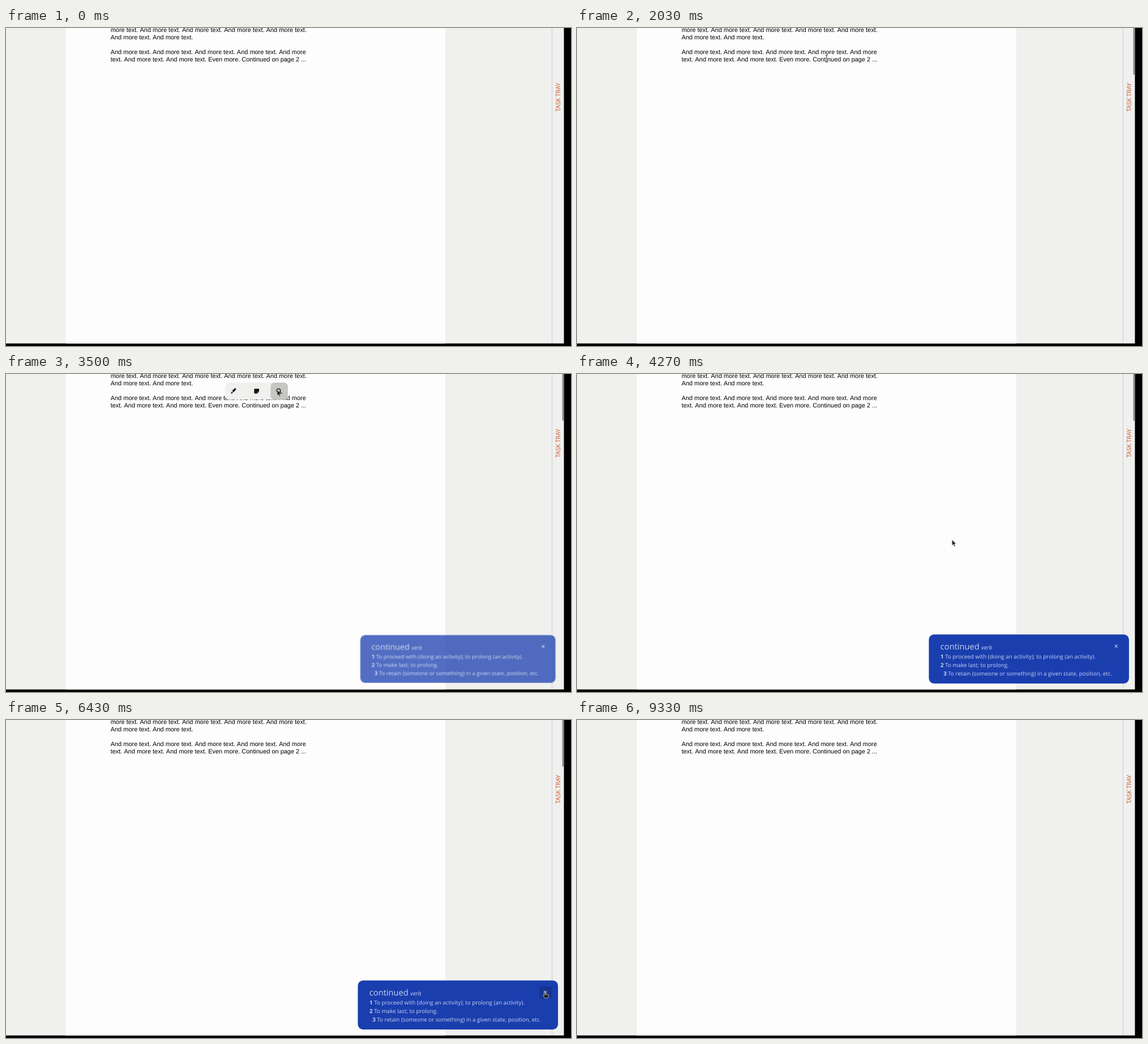
These frames come from a looping animation (998x561 px, 9.36 s). An HTML page:

```html
<!DOCTYPE html>
<html lang="en">
<head>
<meta charset="utf-8">
<title>Word lookup in a document viewer</title>
<style>
  html, body { margin: 0; width: 100%; height: 100%; overflow: hidden; background: #000; }
  svg { display: block; width: 100vw; height: 100vh; }
  text { text-rendering: geometricPrecision; white-space: pre; }
  .doc { font: 10.97px "Liberation Sans", Arial, sans-serif; font-kerning: none; }
  .ui { font-family: "Open Sans", "Noto Sans", sans-serif; }
  .tray { font-size: 10.9px; letter-spacing: -.25px; fill: #c95a2c; }
  .card text { font-size: 9.85px; fill: #c6d2f0; }
  .card .word { font-size: 14.7px; }
  .card .kind { font-size: 10px; font-style: italic; }
  .card .num { font-weight: 700; }

  .pointer, .arrow, .beam, .hand, .thumb, .mark, .tools, .find, .card, .close {
    animation: 9360ms linear infinite;
  }
  .arrow, .beam, .hand, .mark, .find, .close { animation-timing-function: step-end; }

  /* pointer path */
  .pointer { animation-name: move; }
  @keyframes move {
    0%, 5.98% { transform: translate(983px, 300px); animation-timing-function: ease-out; }
    9.93%, 10.36% { transform: translate(503px, 193.5px); animation-timing-function: ease-in; }
    15% { transform: translate(470px, 90px); animation-timing-function: ease-out; }
    18.2%, 24.6% { transform: translate(441px, 54px); animation-timing-function: ease-in; }
    28.8% { transform: translate(468px, 36px); animation-timing-function: ease-out; }
    32.05% { transform: translate(475px, 30px); }
    34.2%, 39% { transform: translate(479px, 28px); animation-timing-function: ease-in; }
    45.62% { transform: translate(662px, 292px); }
    52% { transform: translate(890px, 440px); animation-timing-function: ease-out; }
    58%, 69.2% { transform: translate(950px, 480px); animation-timing-function: ease-in; }
    71% { transform: translate(956px, 452px); }
    78.5%, 100% { transform: translate(983px, 250px); }
  }

  /* pointer shapes */
  .arrow { animation-name: arrow; }
  @keyframes arrow {
    0% { opacity: 0; } 5.98% { opacity: 1; }
    17.6% { opacity: 0; } 35.8% { opacity: 1; }
    57.4% { opacity: 0; } 69.8% { opacity: 1; }
    78.5%, 100% { opacity: 0; }
  }
  .beam { animation-name: beam; }
  @keyframes beam {
    0% { opacity: 0; } 17.6% { opacity: 1; } 27.4%, 100% { opacity: 0; }
  }
  .hand { animation-name: hand; }
  @keyframes hand {
    0% { opacity: 0; } 27.4% { opacity: 1; } 35.8% { opacity: 0; }
    57.4% { opacity: 1; } 69.8%, 100% { opacity: 0; }
  }

  /* interface states */
  .thumb { animation-name: thumb; }
  @keyframes thumb {
    0%, 7.5% { opacity: 0; } 12.3%, 91.9% { opacity: 1; } 95.1%, 100% { opacity: 0; }
  }
  .mark { animation-name: mark; }
  @keyframes mark {
    0% { opacity: 0; } 21.9% { opacity: 1; } 35.3%, 100% { opacity: 0; }
  }
  .tools { animation-name: tools; }
  @keyframes tools {
    0%, 22.8% { opacity: 0; } 24.2%, 38% { opacity: 1; } 39.5%, 100% { opacity: 0; }
  }
  .find { animation-name: find; }
  @keyframes find {
    0% { opacity: 0; } 28.5% { opacity: 1; } 39.5%, 100% { opacity: 0; }
  }
  .card { animation-name: card; transform-origin: 798.3px 502.7px; }
  @keyframes card {
    0%, 36.11% { opacity: 0; transform: scale(.9); }
    37.82%, 69.2% { opacity: 1; transform: none; }
    70.8%, 100% { opacity: 0; transform: scale(.9); }
  }
  .close { animation-name: close; }
  @keyframes close {
    0% { opacity: 0; } 57.4% { opacity: 1; } 69.8%, 100% { opacity: 0; }
  }
</style>
</head>
<body>
<svg viewBox="0 0 998 561" preserveAspectRatio="none">
  <!-- viewer -->
  <rect width="998" height="561"/>
  <rect width="985.5" height="556.5" fill="#f0f0ef"/>
  <rect x="105.5" width="670.5" height="556.5" fill="#fdfdfd"/>
  <rect x="964" width="1" height="556.5" fill="#c9c9d3"/>
  <text class="ui tray" transform="translate(979 147.5) rotate(-90)">TASK TRAY</text>
  <rect class="thumb" x="982.6" y="-4" width="2.6" height="86.5" rx="1.3" fill="#858585"/>

  <g class="doc">
    <text x="184.7" y="6.9">more text. And more text. And more text. And more text. And more text.</text>
    <text x="184.7" y="19.6">And more text. And more text.</text>
    <text x="184.7" y="46.2">And more text. And more text. And more text. And more text. And more</text>
    <text x="184.7" y="58.9">text. And more text. And more text. Even more. Continued on page 2 ...</text>
  </g>
  <rect class="mark" x="416.5" y="48" width="50" height="15" fill="#ef8d2e" fill-opacity=".5"/>

  <!-- selection tools -->
  <g class="tools">
    <rect x="387" y="15" width="111" height="30" rx="7" fill="#f0f0ef"/>
    <rect class="find" x="467.3" y="15" width="30.5" height="30.5" rx="7" fill="#c6c6c5"/>
    <path d="M397.3 34.8l1.2-4 2.6 2.6zM399.3 29.8l4.3-4.2q1.4-1.1 2.4-.2 1 1.1 0 2.4l-4.1 4.5z" fill="#111"/>
    <path d="M439.3 26h6.8q.9 0 .9.9v4.6l-3 3h-4.7q-.9 0-.9-.9v-6.7q0-.9.9-.9z" fill="#111"/>
    <path d="M447 31.5h-2.1q-.9 0-.9.9v2.1" fill="none" stroke="#bbb" stroke-width=".7"/>
    <g fill="none" stroke="#111" stroke-width="1.4">
      <circle cx="481.4" cy="29.4" r="3.3"/>
      <path d="M483.8 31.8l3 3" stroke-linecap="round"/>
    </g>
  </g>

  <!-- definition card -->
  <g class="card ui">
    <rect x="621.5" y="459.5" width="353.5" height="86.5" rx="9" fill="#1a3eae"/>
    <rect class="close" x="942" y="470" width="22" height="21.5" rx="4" fill="#17358f"/>
    <path d="M950 477.6l5 5m0-5l-5 5" stroke="#c6d2f0" stroke-width="1.1"/>
    <text class="word" x="641.8" y="486">continued</text>
    <text class="kind" x="714.3" y="486">verb</text>
    <text x="642" y="501.5"><tspan class="num">1</tspan> To proceed with (doing an activity); to prolong (an activity).</text>
    <text x="642" y="516.8"><tspan class="num">2</tspan> To make last; to prolong.</text>
    <text x="642" y="532">  <tspan class="num">3</tspan> To retain (someone or something) in a given state, position, etc.</text>
  </g>

  <!-- pointer -->
  <g class="pointer" stroke-linejoin="round">
    <path class="arrow" d="M0 0v10.6l2.5-2.3 1.7 3.9 1.8-.8-1.7-3.8h3.2z"
      fill="#1c1c1c" stroke="#f4f4f4" stroke-width=".7"/>
    <g class="beam" fill="none">
      <path d="M-2-6h4M0-6V6M-2 6h4" stroke="#fff" stroke-width="2"/>
      <path d="M-2-6h4M0-6V6M-2 6h4" stroke="#222"/>
    </g>
    <path class="hand" d="M.3 1.2q0-1.2 1-1.2t1 1.2v3.4q.2-.7 1-.7t1 .8q.2-.6.9-.6t1 .9q.2-.5.9-.5 1 .1 1 1.2v2.6q0 2.6-2.4 2.6H3.4q-1.3 0-2.2-1.3L-.7 7q-.5-1 .1-1.4.5-.3.9.2z"
      fill="#222" stroke="#eee" stroke-width=".7"/>
  </g>
</svg>
</body>
</html>
```
